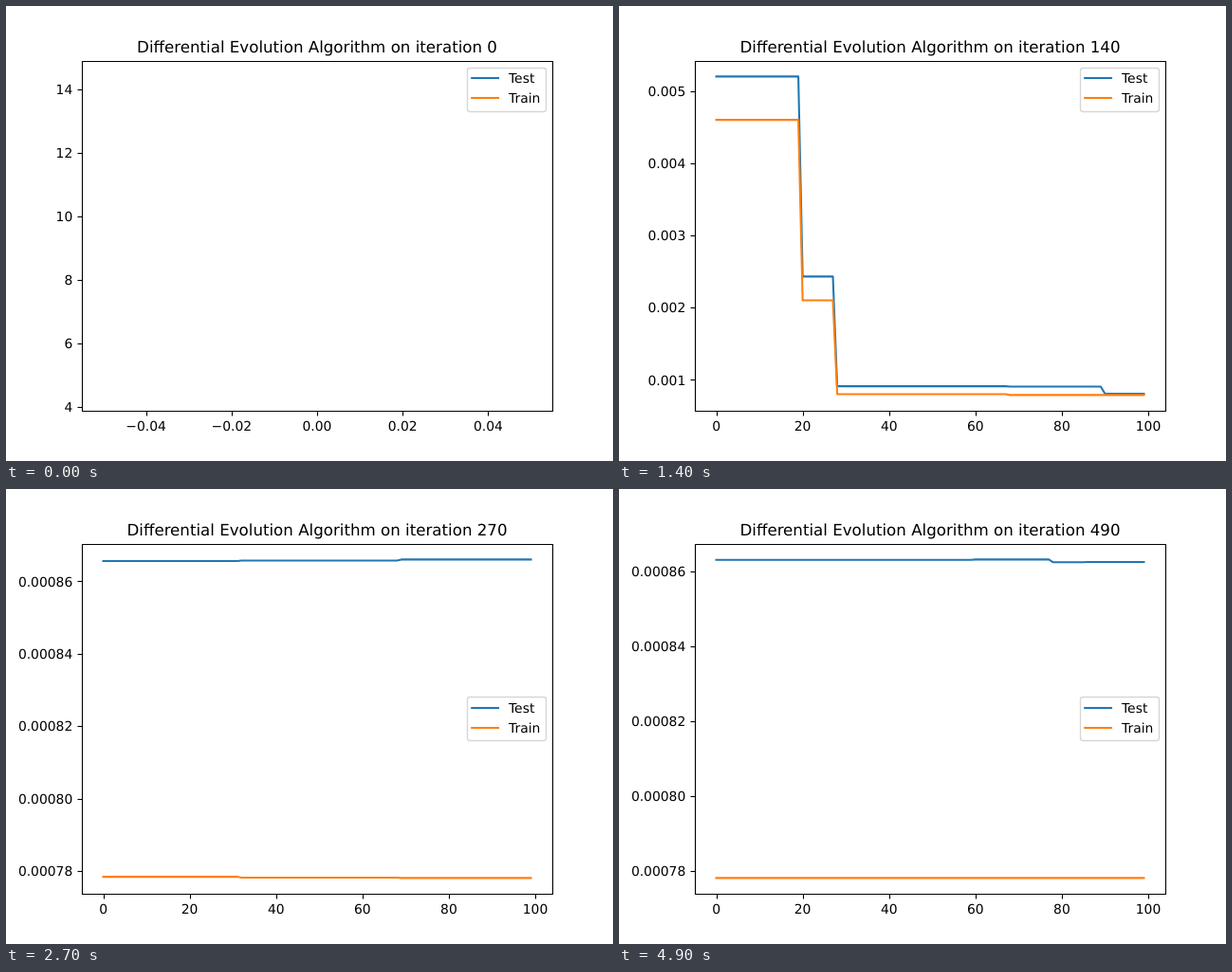
An HTML page that plays this animation: 640x480 px, repeating every 5910 ms.

```html
<!DOCTYPE html>
<html lang="en">
<head>
<meta charset="utf-8">
<title>Convergence plot</title>
<style>
  html, body { margin: 0; width: 100%; height: 100%; overflow: hidden; background: #fff; }
  svg { display: block; }
  text { font-family: "DejaVu Sans", sans-serif; font-size: 13.889px; fill: #000; text-rendering: geometricPrecision; }
  .title { font-size: 16.667px; }
  .mid { text-anchor: middle; }
  .end { text-anchor: end; }
  .axis { fill: none; stroke: #000; stroke-width: 1.11; }
  .line { fill: none; stroke-width: 2.083; stroke-linecap: square; stroke-linejoin: round; }
  .test { stroke: #1f77b4; }
  .train { stroke: #ff7f0e; }
  .frame { fill: #fff; fill-opacity: .8; stroke: #ccc; stroke-opacity: .8; stroke-width: 1.389; }
</style>
</head>
<body>
<svg id="plot" width="640" height="480" viewBox="0 0 640 480"></svg>
<script>
const STEP_MS = 100, LOOP_MS = 5910, LAST = 49, WINDOW = 100;
const BOX = { left: 80, right: 576, top: 57.6, bottom: 427.2 };
const MARGIN = 0.05;
const LEGEND_DROP = 230; // the legend moves to the centre from this iteration on

// [first iteration, test error, train error]; values hold until the next row
const LEVELS = [
  [0, 4.377, 14.41], [2, 4.29, 14.33], [3, 4.09, 14.105],
  [4, 0.8, 2.589], [18, 0.305, 2.357], [19, 0.022, 0.018],
  [22, 0.0052, 0.0046], [61, 0.00243, 0.0021],
  [69, 910e-6, 799.9e-6], [109, 904.8e-6, 788.4e-6],
  [131, 806e-6, 788.3e-6], [143, 874.4e-6, 779.05e-6],
  [164, 865.6e-6, 778.4e-6], [203, 865.7e-6, 778.15e-6],
  [240, 866e-6, 778.06e-6], [303, 860.62e-6, 778.02e-6],
  [325, 863.43e-6, 778.02e-6], [386, 863.1e-6, 778.02e-6],
  [451, 863.19e-6, 778.02e-6], [469, 862.46e-6, 778.02e-6],
  [477, 862.53e-6, 778.02e-6]
];

const history = [];
for (let i = 0, row = 0; i <= LAST * 10; i++) {
  if (LEVELS[row + 1] && LEVELS[row + 1][0] <= i) row++;
  history.push(LEVELS[row]);
}

// Axis range with margins, tick values and a mapping to pixels
function makeAxis(min, max, from, to) {
  const pad = (max - min) * MARGIN, lo = min - pad, hi = max + pad;
  const raw = (hi - lo) / 9;
  const power = 10 ** Math.floor(Math.log10(raw));
  const step = [1, 2, 2.5, 5, 10].find(s => s * power >= raw * 0.999999) * power;
  let digits = 0;
  while (Math.abs(step * 10 ** digits - Math.round(step * 10 ** digits)) > 1e-6) digits++;
  const ticks = [];
  for (let k = Math.ceil(lo / step - 1e-9); k * step <= hi + step * 1e-9; k++) ticks.push(k * step);
  return {
    ticks,
    map: v => from + (v - lo) / (hi - lo) * (to - from),
    label: v => (v < 0 ? "\u2212" : "") + Math.abs(v).toFixed(digits)
  };
}

const text = (x, y, s, cls = "") => `<text class="${cls}" x="${x}" y="${y}">${s}</text>`;
const path = (d, cls) => `<path class="${cls}" d="${d}"/>`;

function curve(rows, col, cls, x, y) {
  if (rows.length < 2) return "";
  const points = rows.map((r, i) => x.map(i).toFixed(2) + " " + y.map(r[col]).toFixed(2));
  return path("M" + points.join("L"), "line " + cls);
}

function xTick(axis, v) {
  const x = axis.map(v);
  return path(`M${Math.round(x) + 0.5} 427.5v5`, "axis") + text(x.toFixed(2), 448, axis.label(v), "mid");
}

function yTick(axis, v) {
  const y = axis.map(v);
  return path(`M80.5 ${Math.round(y) + 0.5}h-5`, "axis") + text(70.28, Math.round(y + 5.3), axis.label(v), "end");
}

function legend(centred) {
  const top = centred ? 219.5 : 65.5, mid = centred ? 231 : 76;
  const entry = (y, name) =>
    path(`M491.2 ${y}h27.8`, "line " + name.toLowerCase()) + text(530, y + 5, name);
  return `<rect class="frame" x="486.5" y="${top}" width="83" height="46" rx="2.78"/>` +
    entry(mid, "Test") + entry(mid + 21, "Train");
}

function render(n) {
  const rows = history.slice(Math.max(0, n + 1 - WINDOW), n + 1);
  const values = rows.flatMap(r => [r[1], r[2]]);
  const end = rows.length - 1;
  const x = makeAxis(end ? 0 : -0.05, end || 0.05, BOX.left, BOX.right);
  const y = makeAxis(Math.min(...values), Math.max(...values), BOX.bottom, BOX.top);
  return curve(rows, 1, "test", x, y) +
    curve(rows, 2, "train", x, y) +
    x.ticks.map(v => xTick(x, v)).join("") +
    y.ticks.map(v => yTick(y, v)).join("") +
    path("M80.5 58.5H576.5V427.5H80.5Z", "axis") +
    text(328, 49, "Differential Evolution Algorithm on iteration " + n, "title mid") +
    legend(n >= LEGEND_DROP);
}

const plot = document.getElementById("plot");
const start = performance.now();
let shown = -1;

function tick() {
  const t = (performance.now() - start) % LOOP_MS;
  const k = Math.min(LAST, Math.floor(t / STEP_MS));
  if (k !== shown) {
    shown = k;
    plot.innerHTML = render(k * 10);
  }
  requestAnimationFrame(tick);
}
tick();
</script>
</body>
</html>
```
